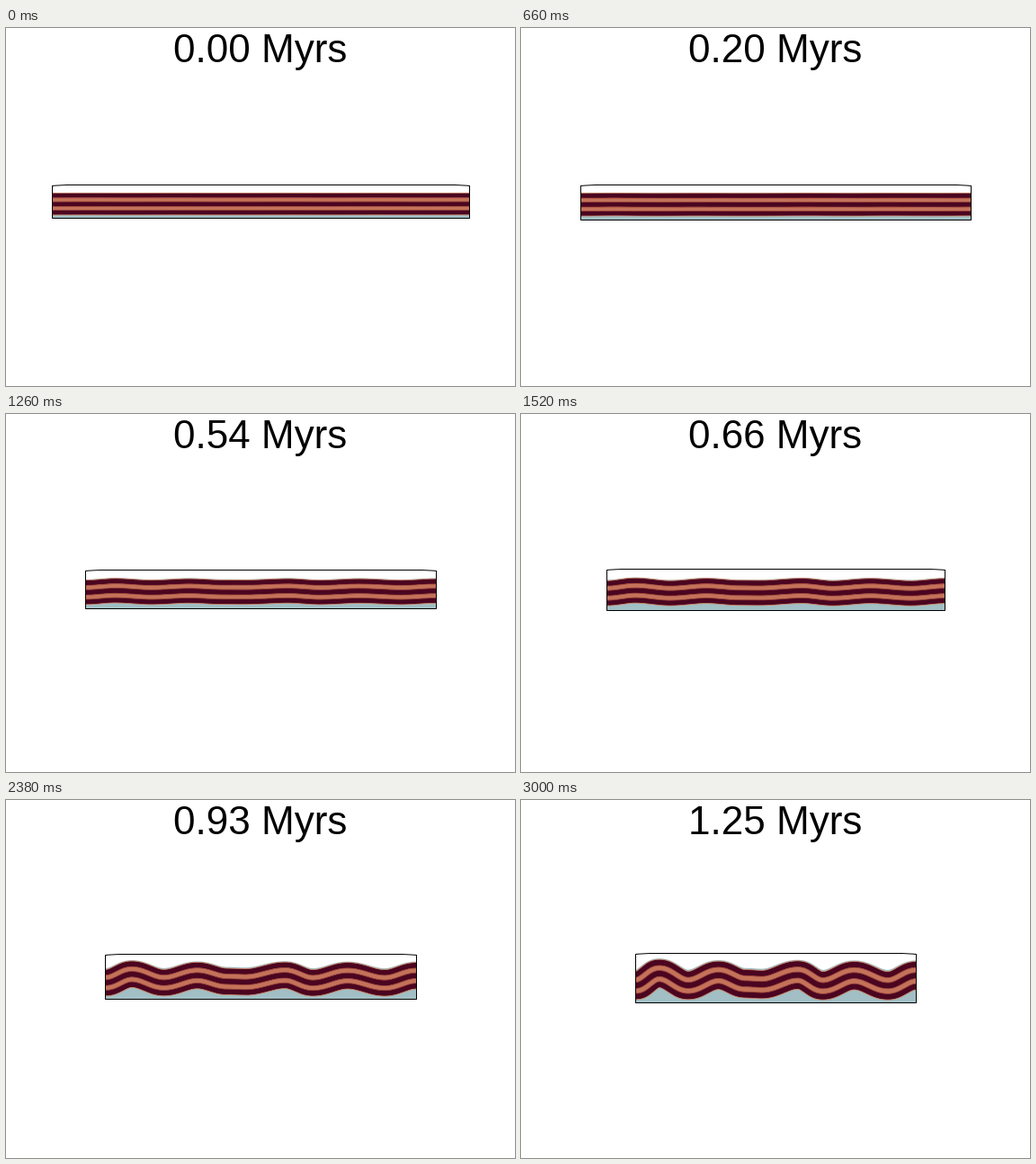
A matplotlib script for the animation above (3.02 s loop, 566 px wide and 398 px high).

```python
import numpy as np
import matplotlib.pyplot as plt
from matplotlib.animation import FuncAnimation
from matplotlib.patches import Polygon

W, H, DPI = 566, 398, 100
FRAMES, STEP = 151, 20
PX = 72 / DPI
RATE = 0.318  # horizontal shortening per Myr

DARK, CLAY, BASE = "#4b0520", "#c4735a", "#a1bfc4"
SEAM, RIM = "#93372f", "#c98464"

# model age (Myr) reached at some steps of the run
STEPS = np.array([0, 27, 33, 50, 54, 76, 81, 93, 108, 119, 135, 150])
AGES = np.array([0, .121, .203, .41, .452, .66, .697, .77, .86, .93, 1.06, 1.25])
SLOPES = np.gradient(AGES, STEPS)
SLOPES[0] = 0.0005

# fold amplitude in pixels against age
AMP_AGE = [0, .2, .41, .66, .77, .93, 1.08, 1.25]
AMP = [.05, .12, .35, 1.5, 2.75, 4.7, 5.9, 6.6]

# crests (negative) and troughs along the relative length
FOLD_U = np.array([0, .084, .187, .295, .39, .45, .578, .667, .779, .899, 1])
FOLD_Y = np.array([.9, -1.1, .9, -.8, .62, .75, -.85, .95, -.75, .95, -.75])

EDGES = [-.5, -.285, -.1075, .1075, .285, .5]


def age_at(i):
    """Cubic Hermite interpolation of the model age."""
    k = min(np.searchsorted(STEPS, i, side="right") - 1, len(STEPS) - 2)
    h = STEPS[k + 1] - STEPS[k]
    s = (i - STEPS[k]) / h
    return ((1 + 2 * s) * (1 - s) ** 2 * AGES[k] + s * (1 - s) ** 2 * h * SLOPES[k]
            + s * s * (3 - 2 * s) * AGES[k + 1] + s * s * (s - 1) * h * SLOPES[k + 1])


def fold(u):
    """Cosine-eased curve through the crests and troughs."""
    u = np.clip(u, 0, 1)
    k = np.clip(np.searchsorted(FOLD_U, u, side="right") - 1, 0, len(FOLD_U) - 2)
    s = (u - FOLD_U[k]) / (FOLD_U[k + 1] - FOLD_U[k])
    ease = (1 - np.cos(np.pi * s)) / 2
    return FOLD_Y[k] + (FOLD_Y[k + 1] - FOLD_Y[k]) * ease


U = np.linspace(-.04, 1.04, 541)
SHAPE = fold(U)

fig = plt.figure(figsize=(W / DPI, H / DPI), dpi=DPI, facecolor="white")
ax = fig.add_axes([0, 0, 1, 1])
ax.set(xlim=(0, W), ylim=(H, 0))
ax.axis("off")
title = ax.text(186, 38, "", family="Liberation Sans", size=44 * PX,
                color="black", ha="left", va="baseline")


def snap(v):
    return np.floor(v) + 0.5


def draw(i):
    for artist in list(ax.patches) + list(ax.lines):
        artist.remove()

    t = age_at(i)
    title.set_text(f"{t:.2f} Myrs")

    stretch = np.exp(RATE * t)
    width = 464 / stretch
    left, right = 283.5 - width / 2, 283.5 + width / 2
    grow = 36.7 * (stretch - 1)
    top, bottom = snap(174.8 - .23 * grow), snap(211.5 + .77 * grow)
    x0, x1 = snap(left), snap(right)
    box = Polygon([(x0, top + 1), (x0 + 3, top + .7), (x0 + 16, top), (x1 - 16, top),
                   (x1 - 3, top + .7), (x1, top + 1), (x1, bottom), (x0, bottom)],
                  fc="none", ec="black", lw=PX, zorder=5)
    ax.add_patch(box)

    amp = np.interp(t, AMP_AGE, AMP)
    thick = 24.3 * np.exp(.65 * RATE * t)
    x = left + U * width
    mid = 195.7 + .25 * grow + amp * SHAPE
    dydx = np.gradient(mid, x)
    lean = .45 * dydx / np.hypot(1, dydx)

    def level(d):
        return x - lean * d * thick, mid + d * thick

    def band(a, b, color):
        xy = np.column_stack([np.r_[a[0], b[0][::-1]], np.r_[a[1], b[1][::-1]]])
        ax.add_patch(Polygon(xy, fc=color, ec="none", clip_path=None, zorder=2))
        ax.patches[-1].set_clip_path(box)

    def seam(d, color, px):
        line, = ax.plot(*level(d), color=color, lw=px * PX, zorder=3)
        line.set_clip_path(box)

    levels = [level(d) for d in EDGES]
    xt, yt = levels[0]
    film = .15 + .14 * amp * (1 + .45 * SHAPE)
    band((xt, yt - film - .4), levels[0], BASE)
    band(levels[-1], (x, np.full_like(x, bottom)), BASE)
    for k in range(5):
        band(levels[k], levels[k + 1], CLAY if k % 2 else DARK)
    for d in EDGES[1:-1]:
        seam(d, SEAM, .8)
    seam(EDGES[0], RIM, .8)
    seam(EDGES[-1], RIM, .8)
    return [title]


anim = FuncAnimation(fig, draw, frames=FRAMES, interval=STEP,
                     repeat=True, repeat_delay=0, blit=False)
plt.show()
```
